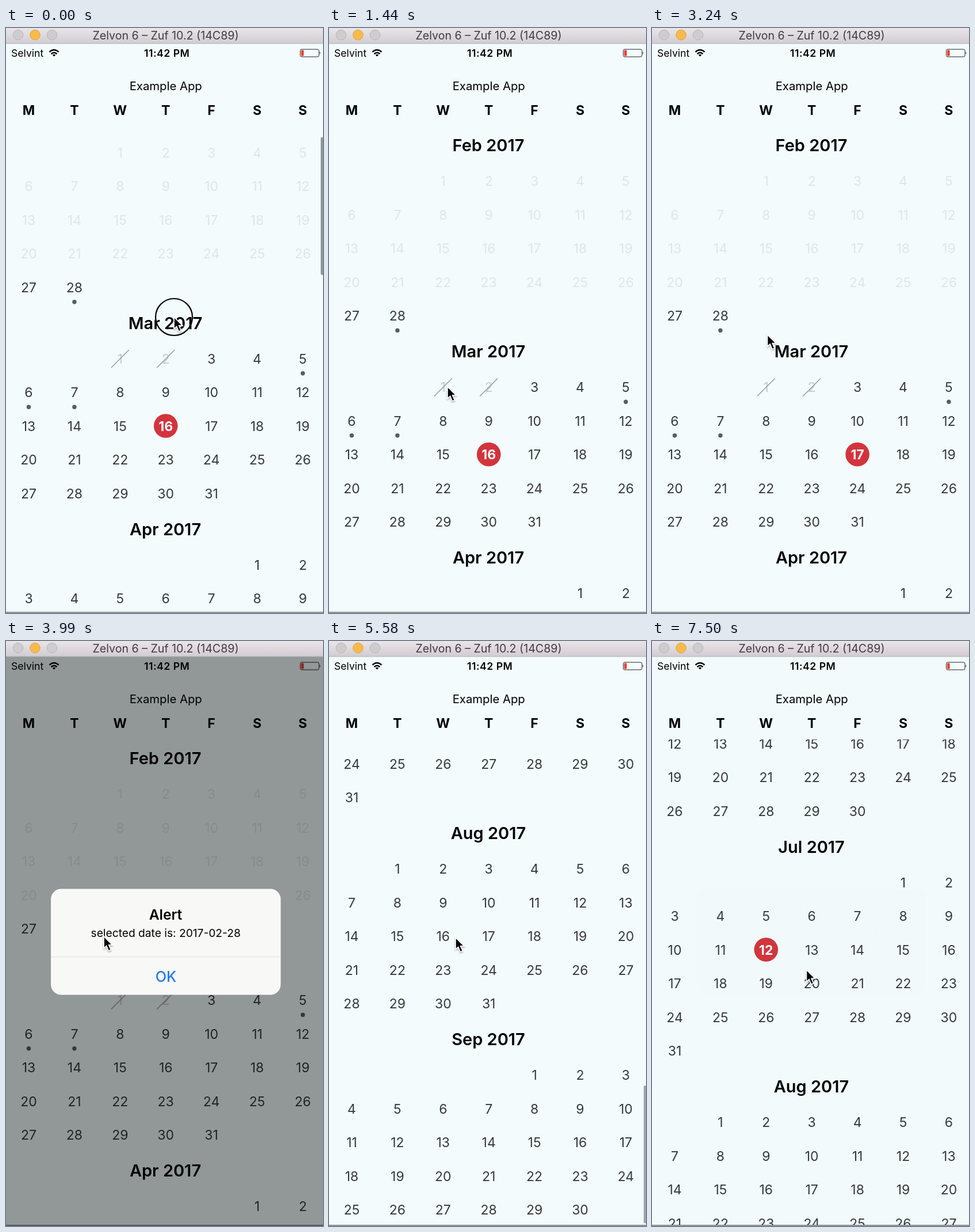
These frames come from a looping animation (551 by 1016 pixels, 7530 ms). An HTML page:

```html
<!DOCTYPE html>
<html lang="en">
<head>
<meta charset="utf-8">
<style>
  html, body { margin: 0; width: 551px; height: 1016px; overflow: hidden; background: #f3fbfc; }
  svg { display: block; }
  text { font-family: Inter, "Open Sans", sans-serif; text-anchor: middle; }
  .day { font-size: 23px; fill: #363a3c; }
  .day.past { fill: #dfe6e8; }
  .day.off { fill: #c6cccf; }
  .day.on { fill: #fff; font-weight: 700; }
  .month { font-size: 29px; font-weight: 600; }
  .week { font-size: 23px; font-weight: 700; }
</style>
</head>
<body>
<svg id="stage" width="551" height="1016" viewBox="0 0 551 1016">
  <defs>
    <linearGradient id="bar" x2="0" y2="1">
      <stop offset="0" stop-color="#e9e5e9"/>
      <stop offset="1" stop-color="#d0ccd1"/>
    </linearGradient>
    <clipPath id="view"><rect y="171" width="551" height="843"/></clipPath>
    <filter id="soft" x="-50%" y="-50%" width="200%" height="200%">
      <feDropShadow dx="0" dy="1.5" stdDeviation="1.3" flood-opacity=".4"/>
    </filter>
  </defs>
  <rect width="551" height="1016" fill="#f3fbfc"/>

  <g clip-path="url(#view)">
    <g id="list"><circle id="mark" r="20.8" fill="#d3343c"/></g>
    <rect id="thumb" x="547" width="5" height="239" rx="2" fill="#8b999c"/>
  </g>

  <g id="head">
    <text x="9" y="49.5" font-size="17.6" style="text-anchor:start">Selvint</text>
    <g fill="none" stroke="#000" stroke-width="2.4">
      <path d="M75.5 41.6Q83.5 34.6 91.5 41.6M78.5 45Q83.5 40.6 88.5 45"/>
      <path d="M83.5 49.5L80.8 46.8Q83.5 44.6 86.2 46.8Z" fill="#000" stroke="none"/>
    </g>
    <text x="279.7" y="49.5" font-size="17.6" font-weight="600" letter-spacing=".5">11:42 PM</text>
    <rect x="511.5" y="37" width="32.5" height="13" rx="2.5" fill="none" stroke="#222"/>
    <rect x="513" y="38.5" width="4.5" height="10" rx="1" fill="#f0392b"/>
    <path d="M545.3 41.3q2.2 2.2 0 4.4z" fill="#222"/>
    <text x="277.7" y="107.5" font-size="20.3">Example App</text>
  </g>

  <path d="M0 1014.8H551" stroke="#6d7274" stroke-width="1.5"/>
  <rect id="dim" y="27" width="551" height="989"/>

  <g id="alert">
    <rect x="78" y="430.5" width="399.5" height="184" rx="18" fill="#f8f9f7"/>
    <path d="M78 548.7H477.5" stroke="#dcdddd"/>
    <text x="277.5" y="483.7" font-size="24.5" font-weight="600">Alert</text>
    <text id="msg" x="277.7" y="513.5" font-size="19.2"></text>
    <text x="278" y="591.5" font-size="25" font-weight="500" fill="#217bf3">OK</text>
  </g>

  <rect width="551" height="27" fill="url(#bar)"/>
  <path d="M0 27H551" stroke="#b3afb4"/>
  <circle cx="21" cy="12" r="8.7" fill="#cfccd0" stroke="#b8b5b9"/>
  <circle cx="50.5" cy="12" r="8.7" fill="#f7ba4b" stroke="#dda23c"/>
  <circle cx="80" cy="12" r="8.7" fill="#cfccd0" stroke="#b8b5b9"/>
  <text x="277.5" y="19.5" font-size="19.6" fill="#403c41">Zelvon 6 – Zuf 10.2 (14C89)</text>

  <g id="cursor">
    <circle id="ring" r="32" fill="none" stroke="#000" stroke-width="2.2"/>
    <path d="M0 0V20.5L4.6 16.3L8.3 25L12.3 23.3L8.6 14.9H15Z"
          stroke="#fff" stroke-width="1.6" filter="url(#soft)"/>
  </g>
</svg>
<script>
const LOOP = 7530, STEP = 30, ROW = 58.5, COL = 79.4;
const $ = id => document.getElementById(id);
const colX = c => 39.5 + COL * c;
const clamp = u => Math.max(0, Math.min(1, u));
const smooth = u => u * u * (3 - 2 * u);
const mix = (a, b, u) => a + (b - a) * u;
const part = (t, from, to) => clamp((t - from) / (to - from));

function add(parent, tag, attrs, label) {
  const el = document.createElementNS('http://www.w3.org/2000/svg', tag);
  for (const k in attrs) el.setAttribute(k, attrs[k]);
  if (label !== undefined) el.textContent = label;
  parent.appendChild(el);
  return el;
}

// Calendar list, February to September 2017
const cells = {};
const dotted = ['2-28', '3-5', '3-6', '3-7'];

function buildCalendar() {
  const list = $('list');
  [...'MTWTFSS'].forEach((d, c) => add($('head'), 'text', { class: 'week', x: colX(c), y: 150.5 }, d));
  let top = 204;
  'Feb Mar Apr May Jun Jul Aug Sep'.split(' ').forEach((name, i) => {
    const month = i + 2;
    const first = (new Date(Date.UTC(2017, month - 1, 1)).getUTCDay() + 6) % 7;
    const days = new Date(Date.UTC(2017, month, 0)).getUTCDate();
    add(list, 'text', { class: 'month', x: 277, y: top + 10.3 }, name + ' 2017');
    for (let d = 1; d <= days; d++) {
      const slot = first + d - 1, key = month + '-' + d;
      const x = colX(slot % 7), y = top + 62 + ROW * Math.floor(slot / 7);
      const off = month === 3 && d < 3;
      const kind = month === 2 && d < 27 ? 'day past' : off ? 'day off' : 'day';
      const el = add(list, 'text', { class: kind, x, y: y + 8.2 }, d);
      cells[key] = { el, x, y, kind };
      if (off) add(list, 'path', { d: `M${x - 15.5} ${y + 15.5}l31-31`, stroke: '#9a9ea0', 'stroke-width': 1.6 });
      if (dotted.includes(key)) add(list, 'circle', { cx: x, cy: y + 25.2, r: 3.7, fill: '#595c5e' });
    }
    top += 124 + ROW * (Math.ceil((first + days) / 7) - 1);
  });
}

// Scrolling: each move eases from the last offset to its own
const scrolls = [
  { from: 0, to: 450, y: 0 },
  { from: 4780, to: 5520, y: 2076.5 },
  { from: 5650, to: 6330, y: 1636.5 }
];
const scrollAt = t => scrolls.reduce((y, s) => mix(y, s.y, smooth(part(t, s.from, s.to))), 49.5);
const thumbAt = t => Math.max(...scrolls.map(s =>
  Math.min(s.from ? part(t, s.from - 50, s.from + 50) : 1, 1 - part(t, s.to, s.to + 400))));

// Pointer: what the hand does, in order; alerts follow from its taps
const moves = [], alerts = [];
const move = (t, x, y, down = false) => moves.push({ t, x, y, down });

function tap(t, x, y) {
  move(t, x, y, true);
  move(t + 90, x, y);
  move(t + 180, x, y);
}
function pick(t, day) {
  const { x, y } = cells[day];
  tap(t, x + 4, y - scrollAt(t) - 10);
  alerts.push({ day, open: t + 105 });
}
function confirm(t) {
  tap(t, 276, 574);
  alerts[alerts.length - 1].close = t + 90;
}
function act() {
  move(0, 292, 502, true);
  move(450, 286, 552);
  move(1440, 206, 623);
  pick(2230, '3-17');
  move(2640, 288, 548);
  confirm(2810);
  pick(3495, '2-28');
  move(3990, 170, 513);
  confirm(4240);
  move(4780, 262, 640, true);
  move(5300, 220, 515);
  move(5650, 220, 515, true);
  move(5920, 232, 630);
  pick(6690, '7-12');
  confirm(7150);
  move(LOOP, 268, 571);
}

let chosen = null;
function select(key) {
  if (key === chosen) return;
  if (chosen) cells[chosen].el.setAttribute('class', cells[chosen].kind);
  const { el, x, y } = cells[key];
  el.setAttribute('class', 'day on');
  $('mark').setAttribute('cx', x);
  $('mark').setAttribute('cy', y - .5);
  $('msg').textContent = 'selected date is: 2017-' + key.split('-').map(n => n.padStart(2, '0')).join('-');
  chosen = key;
}

function drawAlert(t) {
  const a = alerts.filter(a => t >= a.open).pop();
  select(a ? a.day : '3-16');
  const rise = a ? 1 - (1 - part(t, a.open, a.open + 290)) ** 2 : 0;
  const shown = a ? rise * (1 - part(t, a.close, a.close + 280)) ** 2 : 0;
  $('dim').setAttribute('opacity', .4 * shown);
  $('alert').setAttribute('opacity', shown);
  $('alert').setAttribute('transform', `translate(277.7 522.5) scale(${1.2 - .2 * rise}) translate(-277.7 -522.5)`);
}

function drawCursor(t) {
  const i = moves.findIndex(m => m.t > t);
  const a = moves[i - 1], b = moves[i];
  const u = smooth(part(t, a.t, b.t));
  $('cursor').setAttribute('transform', `translate(${mix(a.x, b.x, u)} ${mix(a.y, b.y, u)})`);
  $('ring').setAttribute('opacity', a.down ? 1 : 0);
}

function draw(t) {
  const y = scrollAt(t);
  $('list').setAttribute('transform', `translate(0 ${-y})`);
  $('thumb').setAttribute('y', 175.6 + y * .2873);
  $('thumb').setAttribute('opacity', thumbAt(t));
  drawAlert(t);
  drawCursor(t);
}

buildCalendar();
act();
draw(0);
let start = null;
function tick(now) {
  if (start === null) start = now;
  draw(Math.floor((now - start) % LOOP / STEP) * STEP);
  requestAnimationFrame(tick);
}
requestAnimationFrame(tick);
</script>
</body>
</html>
```
